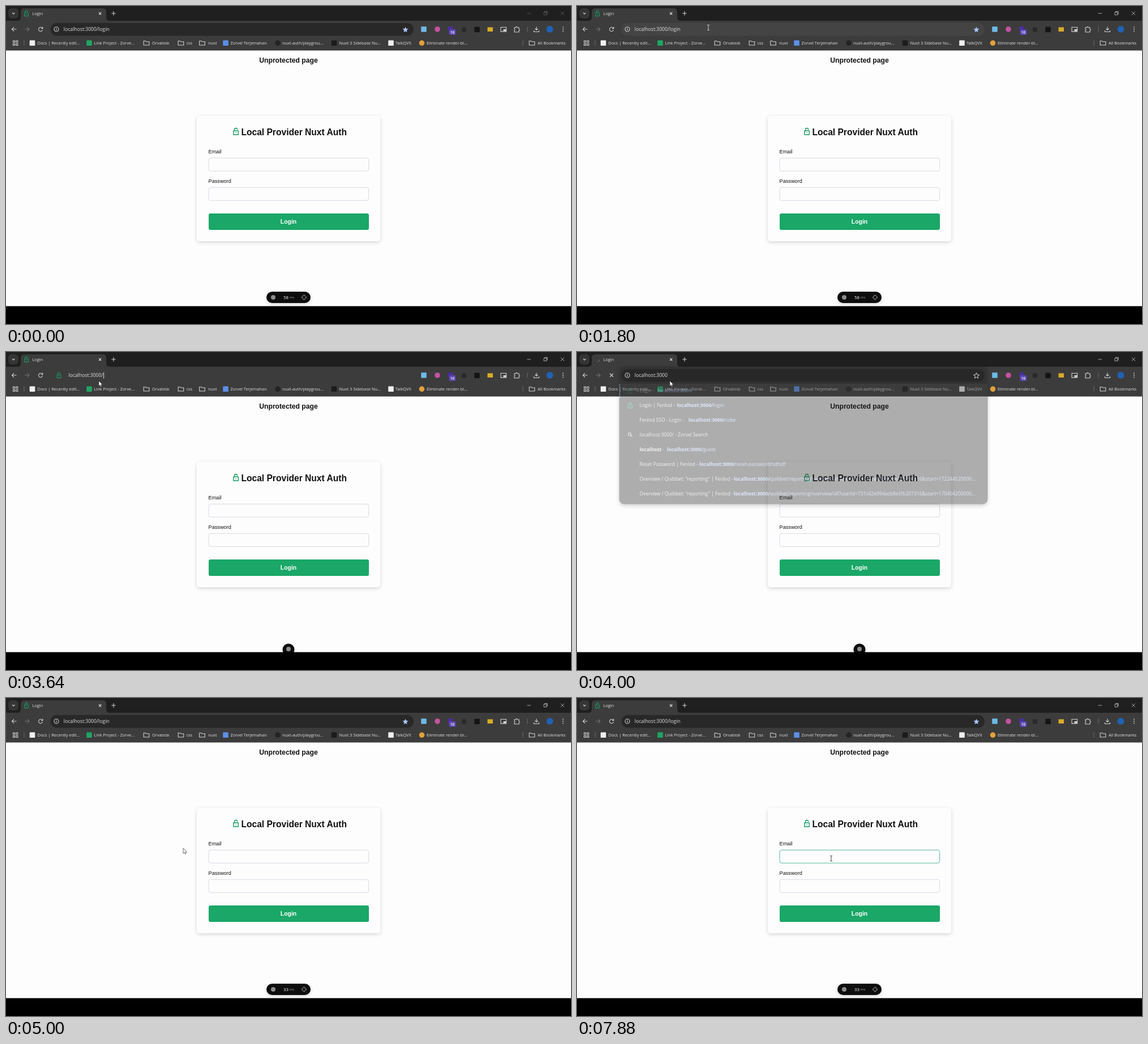
These frames come from a looping animation (998x561 px, 8000 ms). An HTML page:

```html
<!DOCTYPE html>
<html lang="en">
<head>
<meta charset="utf-8">
<title>Login</title>
<style>
  html, body { margin: 0; width: 100%; height: 100%; overflow: hidden; background: #000; }
  svg { display: block; width: 998px; height: 561px; }
  text { white-space: pre; }
  .ui { font: 7.4px 'Open Sans', 'Noto Sans', sans-serif; fill: #e0e0e0; }
  .url { font-size: 8.64px; }
  .row { font-size: 8.5px; }
  .row .link { fill: #a8c7fa; }
  .row .host { font-weight: 700; }
  .badge { font-size: 6.6px; font-weight: 700; }
  .page { font: 9.2px 'Liberation Sans', Arial, sans-serif; fill: #111; }
  .bold { font-weight: 700; text-anchor: middle; }
  .line { fill: none; stroke: #d2d2d2; stroke-width: 1.1; }
  .lock { fill: none; stroke: #169b62; stroke-width: 1.1; stroke-linejoin: round; }
  .field { fill: #fdfdfd; stroke: #d4d4e4; stroke-width: .9; }
</style>
</head>
<body>
<svg viewBox="0 0 998 561">
  <defs>
    <g id="lock"><path d="M-3.4-.8h6.8v5.4h-6.8zM-2-.8v-1.8a2 2 0 0 1 4 0v.5M-.6 1.9h1.2"/></g>
    <path id="folder" d="M-4.8-3.6h3.4l1.2 1.3h5v6h-9.6z"/>
    <filter id="soft" x="-20%" y="-20%" width="140%" height="140%">
      <feDropShadow dx="0" dy="2" stdDeviation="3" flood-opacity=".16"/>
    </filter>
    <filter id="deep" x="-5%" y="-10%" width="110%" height="120%">
      <feDropShadow dx="0" dy="3" stdDeviation="3.5" flood-opacity=".45"/>
    </filter>
  </defs>

  <g id="site">
    <rect y="78" width="998" height="452" fill="#fdfdfd"/>
    <text class="page bold" x="499" y="99.5" style="font-size:12.2px">Unprotected page</text>
    <rect x="337" y="194" width="324" height="221" rx="5" fill="#fdfdfd" filter="url(#soft)"/>
    <use href="#lock" class="lock" transform="translate(406 221.2) scale(1.25)"/>
    <text class="page bold" x="508.7" y="228" style="font-size:15.6px">Local Provider Nuxt Auth</text>
    <text class="page" x="357.5" y="260.2">Email</text>
    <rect id="email" class="field" x="358" y="268.2" width="282.6" height="23" rx="3.5"/>
    <path id="caret" d="M366 274.5v11.5" stroke="#111" stroke-width=".9"/>
    <text class="page" x="357.5" y="312.2">Password</text>
    <rect class="field" x="358" y="320.2" width="282.6" height="23" rx="3.5"/>
    <rect x="358" y="366" width="283" height="29" rx="3" fill="#1aa767"/>
    <text class="page bold" x="499" y="384" style="font-size:10.4px;fill:#fff">Login</text>
    <g id="pill">
      <rect id="pillBox" fill="#111" filter="url(#soft)"/>
      <circle id="pillMark" r="4" fill="#8c8c8c"/>
      <g id="pillInfo">
        <text class="ui" id="ms" x="490" y="516.9" style="font-size:7.8px;fill:#fff"></text>
        <text class="ui" x="501" y="516.4" style="font-size:6px;fill:#aaa">ms</text>
        <g class="line" style="stroke:#8c8c8c;stroke-width:.9">
          <circle cx="526.5" cy="514" r="3.5"/>
          <path d="M526.5 509v2.8m0 4.4v2.8m-5-5h2.8m4.4 0h2.8"/>
        </g>
      </g>
    </g>
  </g>

  <rect y="529.5" width="998" height="31.5"/>
  <g id="chrome"></g>
  <g id="popup" filter="url(#deep)"></g>

  <g id="omnibox">
    <rect id="bar" x="78.5" y="30" width="641.5" height="22.5" rx="11.2"/>
    <g id="info" class="line"><circle cx="89" cy="41" r="4"/><path d="M89 40.3v2.8M89 38.4v1"/></g>
    <use id="barLock" href="#lock" class="lock" x="93.5" y="41"/>
    <rect id="selection" y="35.5" height="12" fill="#3f70b8"/>
    <text id="address" class="ui url" y="44.4"></text>
    <path id="barCaret" d="M172.6 36v11" stroke="#fff" stroke-width=".8"/>
    <polygon id="star"/>
  </g>

  <path id="arrow" d="M0 0v9.2l2.1-2 1.4 3.2 1.5-.7-1.4-3h2.9z" fill="#fff" stroke="#222" stroke-width=".7"/>
  <path id="beam" d="M-2-4.6h1.4l.6.5.6-.5h1.4M0-4.1v8.2M-2 4.6h1.4l.6-.5.6.5h1.4" fill="none" stroke-width=".9"/>
</svg>

<script>
const $ = id => document.getElementById(id);
const set = (id, attrs) => { for (const k in attrs) $(id).setAttribute(k, attrs[k]); };
const show = (id, on) => { $(id).style.display = on ? '' : 'none'; };

const text = (x, y, s, cls = '') => `<text class="ui ${cls}" x="${x}" y="${y}">${s}</text>`;
const line = (d, style = '') => `<path class="line" d="${d}" style="${style}"/>`;
const square = (x, y, fill, r = 4.8) =>
  `<rect x="${x - r}" y="${y - r}" width="${2 * r}" height="${2 * r}" rx="1.2" fill="${fill}"/>`;
const circle = (x, y, fill, r = 4.8) => `<circle cx="${x}" cy="${y}" r="${r}" fill="${fill}"/>`;
const folder = (x, y) => `<use href="#folder" class="line" x="${x}" y="${y}"/>`;

// icon painter, icon x, icon colour, label x, label
const bookmarks = [
  [square, 46.5, '#f0f0f0', 55.5, 'Docs | Recently edit...'],
  [square, 147, '#1fa463', 155.5, 'Link Project - Zorve...'],
  [folder, 248, 0, 258, 'Orvatesk'],
  [folder, 309, 0, 318.5, 'css'],
  [folder, 346.5, 0, 357, 'nuxt'],
  [square, 388, '#5c8fe6', 396.5, 'Zorvel Terjemahan'],
  [circle, 480, '#242424', 488, 'nuxt-auth/playgrou...'],
  [square, 579.5, '#1c1c1c', 588.5, 'Nuxt 3 Sidebase Nu...'],
  [square, 680, '#f0f0f0', 688, 'TalkQVX'],
  [circle, 734.5, '#e2a13a', 743, 'Eliminate render-bl...'],
  [folder, 929, 0, 939, 'All Bookmarks'],
];

$('chrome').innerHTML = `
  <rect width="998" height="27" fill="#1f1f1f"/>
  <rect y="26" width="998" height="52.5" fill="#3c3c3c"/>
  <path d="M20 26q6 0 6-6V10q0-6 6-6h139q6 0 6 6v10q0 6 6 6z" fill="#3c3c3c"/>
  <rect x="4" y="4" width="18" height="18" rx="6" fill="#353535"/>
  ${line('M11 12l2.2 2.2 2.2-2.2')}
  <use id="tabLock" href="#lock" class="lock" x="36" y="13"/>
  <path id="spinner" class="line" d="M0-4a4 4 0 0 1 4 4"/>
  ${text(46.5, 16, 'Login')}
  ${line('M164 11l4.4 4.4m0-4.4l-4.4 4.4M186.3 13h7.4m-3.7-3.7v7.4')}
  <g id="controls">${line('M920.5 13h6.5M950 11h4.8v4.8H950zM951.6 11V9.6h4.6v4.6h-1.4M979.8 9.8l6.2 6.2m0-6.2l-6.2 6.2', 'stroke-width:.75')}</g>
  ${line('M18.5 41h-8m3.6-3.6L10.5 41l3.6 3.6')}
  ${line('M33 41h8m-3.6-3.6L41 41l-3.6 3.6', 'stroke:#717171')}
  <g id="reload">${line('M64.2 39.3a3.6 3.6 0 1 0 .3 3M64.8 36.8v2.9h-2.9')}</g>
  <g id="stop">${line('M58 38l6 6m0-6l-6 6')}</g>
  ${square(738, 41, '#6db9e6')}${circle(762, 41, '#c452a0')}
  ${square(785, 40, '#4a2f9e', 4)}
  <rect x="782.5" y="41" width="12" height="10" rx="2.5" fill="#5b45b5"/>
  ${text(784.7, 48.6, '10', 'badge')}
  ${square(809, 41.5, '#2a2a2a', 4)}${square(832, 41.5, '#151515')}
  <rect x="850.5" y="37.5" width="9.5" height="7.5" fill="#d9ab28"/>
  ${line('M874 37.5h9.6v7.6H874z')}<rect x="878.5" y="41" width="4.5" height="3.5" fill="#d2d2d2"/>
  ${line('M898 38h2.5a1.4 1.4 0 0 1 2.8 0h2.7v2.7a1.4 1.4 0 0 1 0 2.8V46h-8v-2.8a1.4 1.4 0 0 0 0-2.6z')}
  ${line('M937 36.5v6m-2.6-2.6l2.6 2.6 2.6-2.6M932.5 43v2.5h9V43')}
  ${circle(960.5, 41, '#1f62b4', 6)}
  ${[37.5, 41, 44.5].map(y => circle(984, y, '#d2d2d2', .9)).join('')}
  ${line('M921 36.5v9M32 60.5v9M913 60.5v9', 'stroke:#686868')}
  ${line('M12.5 61.2h3v3h-3zm5.3 0h3v3h-3zm-5.3 5.3h3v3h-3zm5.3 0h3v3h-3z')}
  ${bookmarks.map(([icon, x, fill, tx, label]) => icon(x, 65.3, fill) + text(tx, 68, label)).join('')}`;

// title, x of the address, path after the host
const host = 'localhost:3000';
const report = '/quibbet/reporting/overview/all?userId=731c42e09dacb8e5fb207316&amp;start=';
const overview = 'Overview / Quibbet: "reporting" | Fenlod - ';
const rows = [
  ['Login - ', 142, ''],
  ['Login | Fenlod - ', 176.5, '/login'],
  ['Fenlod SSO - Login - ', 197, '/cobe'],
  ['localhost:3000/ - Zorvel Search'],
  ['<tspan class="host">localhost</tspan> - ', 159, '/guest'],
  ['Reset Password | Fenlod - ', 216, '/reset-password/sdfsdf'],
  [overview, 277, report + '172244520000...'],
  [overview, 277, report + '170404200000...'],
];
$('popup').innerHTML = `
  <rect id="popupBox" x="74.5" y="25" width="651" rx="9" fill="#282828"/>
  <rect x="74.5" y="56" width="651" height="25" fill="#3d3d3d"/>
  <rect x="74.5" y="56" width="1.6" height="25" fill="#a8c7fa"/>
  ${rows.map(([title, x, path], i) => {
    const link = x ? `<tspan class="link" x="${x}"><tspan class="host">${host}${path && '/'}</tspan>${path.slice(1)}</tspan>` : '';
    return text(110.5, 71.2 + 26 * i, title + link, 'row');
  }).join('')}
  <use href="#lock" class="lock" x="94" y="68"/><use href="#lock" class="lock" x="94" y="94"/>
  <circle class="line" cx="93" cy="145" r="2.5"/>${line('M95 147l2.5 2.5')}`;

set('star', { points: Array.from({ length: 10 }, (_, i) => {
  const a = i * Math.PI / 5, r = i % 2 ? 2.4 : 5.3;
  return [705.5 + r * Math.sin(a), 42 - r * Math.cos(a)];
}).join(' ') });

const ramp = (t, a, b) => Math.min(1, Math.max(0, (t - a) / (b - a)));
const ease = k => k * k * (3 - 2 * k);
const mix = (a, b, k) => a + (b - a) * k;

// time, x, y of the pointer
const path = [
  [960, 909, 363], [1800, 232, 38], [2000, 232, 38], [2280, 184, 41], [2400, 184, 41],
  [2760, 160, 46], [3080, 160, 46], [3360, 164, 51], [4400, 164, 51], [4800, 270, 215],
  [5000, 313, 265], [5240, 313, 265], [5480, 330, 397], [5760, 390, 209], [6080, 449, 283],
];
function pointer(t) {
  const i = path.findIndex(p => p[0] > t);
  if (i < 1) return (i ? path[path.length - 1] : path[0]).slice(1);
  const [a, b] = [path[i - 1], path[i]], k = ease(ramp(t, a[0], b[0]));
  return [mix(a[1], b[1], k), mix(a[2], b[2], k)];
}

function draw(t) {
  const within = (a, b) => t >= a && t < b;
  const editing = within(3640, 4000), loading = within(4000, 4560), focused = within(2280, 3640);

  const [x, y] = pointer(t);
  const inBar = x > 98 && x < 695 && y > 29 && y < 50;
  const inField = x > 358 && x < 641 && (y > 268 && y < 292 || y > 320 && y < 344);
  const beam = inBar || inField;
  show('arrow', t >= 760 && !beam);
  show('beam', t >= 760 && beam);
  set(beam ? 'beam' : 'arrow', { transform: `translate(${x} ${y})`, stroke: inBar ? '#ddd' : '#333' });

  set('controls', { opacity: t < 760 ? .4 : 1 });
  show('tabLock', !loading);
  show('spinner', loading);
  set('spinner', { transform: `translate(36 13) rotate(${t * .4 - 60})`, opacity: .35 });
  show('reload', !loading);
  show('stop', loading);

  show('bar', !editing);
  set('bar', { fill: inBar && !focused ? '#444' : '#282828', stroke: focused ? '#a8c7fa' : 'none' });
  show('info', !editing);
  show('barLock', editing);
  show('barCaret', editing);
  set('address', { x: editing ? 110.3 : 101.8 });
  $('address').textContent = host + (editing ? '/' : loading ? '' : '/login');
  show('selection', within(2400, 3640));
  set('selection', { x: Math.max(162, x), width: Math.max(0, 184 - Math.max(162, x)) });
  show('star', !editing);
  set('star', loading ? { fill: 'none', stroke: '#d2d2d2' } : { fill: '#a8c7fa', stroke: 'none' });

  show('popup', within(3680, 4085));
  set('popup', { opacity: t < 4000 ? 1 : (4085 - t) / 230 });
  set('popupBox', { height: t < 3760 ? 373 : 243.5 });

  const open = t < 3600 ? 1 - ease(ramp(t, 2400, 2720)) : ease(ramp(t, 4800, 4960));
  const width = mix(21, 78, open), top = mix(514.5, 504, open), height = mix(21, 20, open);
  set('pillBox', { x: 499 - width / 2, y: top, width, height, rx: height / 2 });
  set('pillMark', { cx: mix(499, 472, open), cy: mix(524, 514, open) });
  set('pillInfo', { opacity: ramp(open, .6, 1) });
  $('ms').textContent = t < 4000 ? 58 : 33;

  set('email', { style: t >= 6280 ? 'stroke:#45b08c' : '' });
  show('caret', within(6280, 6800) || within(7360, 7880));
}

const FRAME = 40, LOOP = 8000;
function tick(now) {
  draw(Math.floor(now % LOOP / FRAME) * FRAME);
  requestAnimationFrame(tick);
}
tick(0);
</script>
</body>
</html>
```
